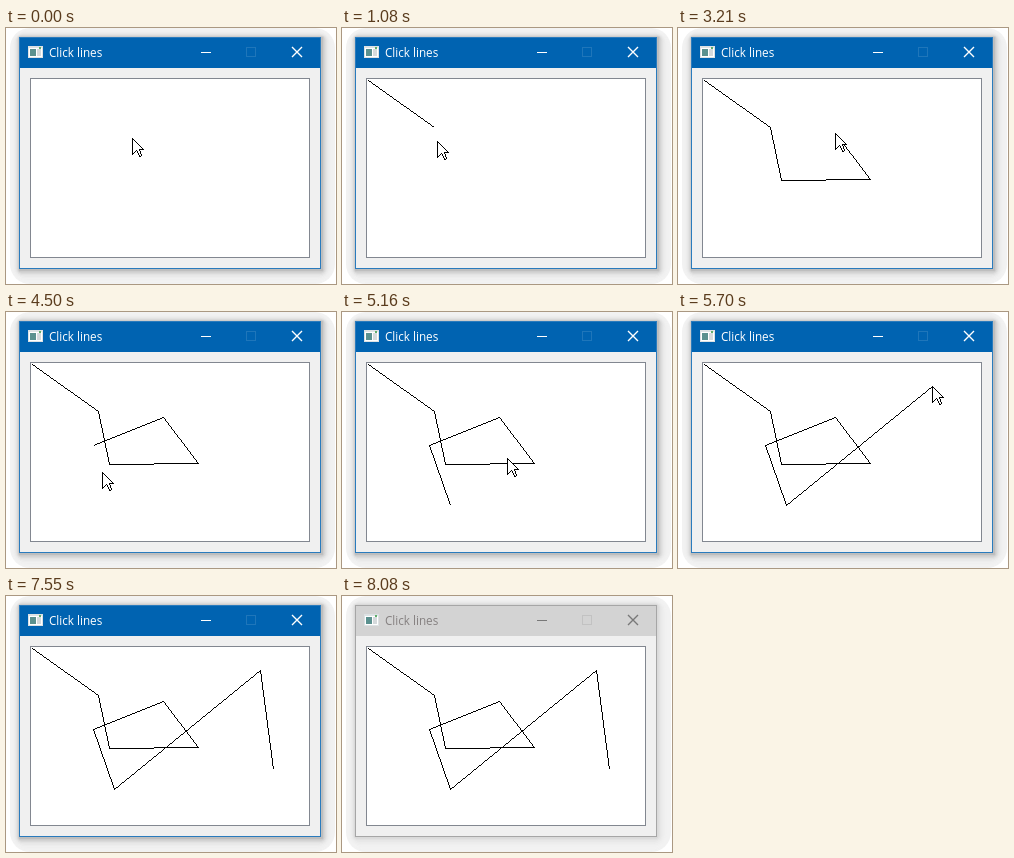
An HTML page with a canvas for the animation above (8.2 s loop, 330 by 256 pixels).

```html
<!DOCTYPE html>
<html lang="en">
<head>
<meta charset="utf-8">
<title>Click lines</title>
<style>
  html, body { margin: 0; width: 100%; height: 100%; overflow: hidden; background: #fff; }
  canvas { display: block; width: 330px; height: 256px; }
</style>
</head>
<body>
<canvas id="stage" width="330" height="256"></canvas>
<script>
const ctx = document.getElementById('stage').getContext('2d');
const LOOP = 8200, LEAVE = 8080, STEP = 132;

// Pointer travel: it starts at `at` and reaches x, y in `steps` jumps.
// A `click` time adds a line to that point.
const hops = [
  { at: 120, steps: 2, x: 92, y: 99, click: 770 },
  { at: 1080, steps: 3, x: 103, y: 152, click: 1630 },
  { at: 1880, steps: 1, x: 105, y: 153 },
  { at: 2000, steps: 3, x: 192, y: 151, click: 2420 },
  { at: 2850, steps: 3, x: 157, y: 105, click: 3210 },
  { at: 3460, steps: 3, x: 87, y: 133, click: 4130 },
  { at: 4380, steps: 2, x: 104, y: 186 },
  { at: 4620, steps: 1, x: 108, y: 193, click: 4770 },
  { at: 4890, steps: 7, x: 254, y: 74, click: 5700 },
  { at: 6010, steps: 3, x: 267, y: 173, click: 6370 },
  { at: 6620, steps: 8, x: 271, y: 256 }
];
const home = { x: 126, y: 110 }, origin = { x: 26, y: 52 };

const arrow = [[0, 0], [0, 16], [4, 12], [7, 18], [8, 18], [9, 17], [7, 11], [11, 11]];

const themes = {
  active: { bar: '#0063b1', edge: '#2a7bbd', text: '#fff', button: '#fff', off: '#1f76ba', shade: 190, shift: 2 },
  idle: { bar: '#d3d3d3', edge: '#a6a6a6', text: '#858080', button: '#787878', off: '#c2c2c2', shade: 208, shift: 0 }
};

const mix = (a, b, k) => a + (b - a) * k;
const ease = k => k * k * (3 - 2 * k);

function rect(color, x, y, w, h) {
  ctx.fillStyle = color;
  ctx.fillRect(x, y, w, h);
}

function frame(color, x, y, w, h) {
  ctx.strokeStyle = color;
  ctx.lineWidth = 1;
  ctx.strokeRect(x + 0.5, y + 0.5, w - 1, h - 1);
}

// One-pixel line without smoothing; its last pixel stays open.
function pixelLine(x0, y0, x1, y1) {
  const n = Math.max(Math.abs(x1 - x0), Math.abs(y1 - y0));
  for (let i = 0; i < n; i++) {
    rect('#000', Math.round(mix(x0, x1, i / n)), Math.round(mix(y0, y1, i / n)), 1, 1);
  }
}

function drawHalo({ shade, shift }) {
  const outer = [4, 0, 329, 256], inner = [13, 9, 315 + shift, 241 + shift], layers = 10;
  for (let i = 0; i < layers; i++) {
    const k = i / (layers - 1);
    const [l, t, r, b] = outer.map((v, j) => mix(v, inner[j], k));
    const g = Math.round(mix(242, shade, k ** 3));
    ctx.fillStyle = `rgb(${g},${g},${g})`;
    ctx.beginPath();
    ctx.roundRect(l, t, r - l, b - t, mix(20, 1, k));
    ctx.fill();
  }
}

function drawIcon() {
  rect('#dde2e4', 22, 18, 15, 12);
  rect('#fff', 23, 20, 13, 9);
  rect('#5b918f', 24, 21, 6, 7);
  rect('#d5dadc', 31, 21, 4, 7);
  rect('#5fae6b', 33, 19, 2, 2);
}

function drawWindow(theme) {
  drawHalo(theme);
  rect('#f0f0f0', 13, 9, 302, 232);
  frame(theme.edge, 13, 9, 302, 232);
  rect(theme.bar, 14, 10, 300, 30);
  drawIcon();

  ctx.fillStyle = theme.text;
  ctx.font = '11.7px "Open Sans", "Noto Sans", sans-serif';
  ctx.fillText('Click lines', 43, 29);

  rect(theme.button, 195, 24, 10, 1);
  frame(theme.off, 240, 19, 10, 10);
  ctx.strokeStyle = theme.button;
  ctx.lineWidth = 1.4;
  ctx.beginPath();
  for (const side of [-5, 5]) {
    ctx.moveTo(291 + side, 19);
    ctx.lineTo(291 - side, 29);
  }
  ctx.stroke();

  rect('#fff', 24, 50, 280, 180);
  frame('#828790', 24, 50, 280, 180);
}

function drawLines(t) {
  let from = origin;
  for (const hop of hops) {
    if (!hop.click || hop.click > t) continue;
    pixelLine(from.x, from.y, hop.x, hop.y);
    from = hop;
  }
}

function pointerAt(t) {
  let { x, y } = home;
  for (const hop of hops) {
    if (t < hop.at) break;
    const step = Math.floor((t - hop.at) / STEP) + 1;
    const k = ease(Math.min(1, step / hop.steps));
    x = mix(x, hop.x, k);
    y = mix(y, hop.y, k);
  }
  return [Math.round(x), Math.round(y)];
}

function drawPointer(x, y) {
  const outline = arrow.map(([dx, dy]) => [x + dx, y + dy]);
  ctx.beginPath();
  for (const [px, py] of outline) ctx.lineTo(px + 0.5, py + 0.5);
  ctx.fillStyle = '#fff';
  ctx.fill();
  outline.forEach((p, i) => pixelLine(...p, ...outline[(i + 1) % outline.length]));
}

function draw(t) {
  rect('#fff', 0, 0, 330, 256);
  drawWindow(t < LEAVE ? themes.active : themes.idle);
  drawLines(t);
  drawPointer(...pointerAt(t));
}

const start = performance.now();
function tick() {
  draw((performance.now() - start) % LOOP);
  requestAnimationFrame(tick);
}
tick();
</script>
</body>
</html>
```
